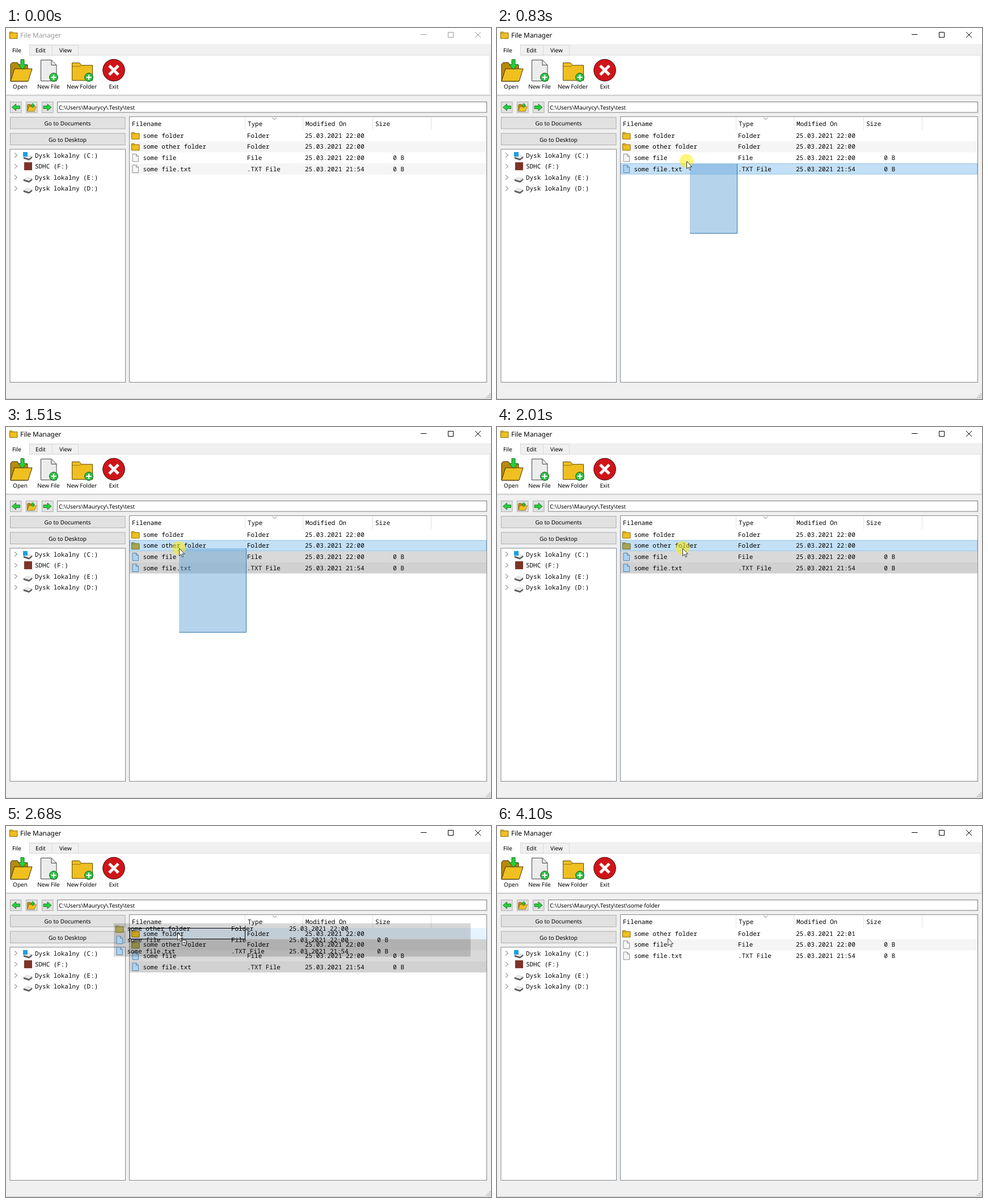
These frames come from a looping animation (855 by 655 pixels, 4160 ms). An HTML page:

```html
<!DOCTYPE html>
<html lang="en">
<head>
<meta charset="utf-8">
<title>File Manager</title>
<style>
  html, body { margin: 0; width: 100%; height: 100%; overflow: hidden; background: #f0f0f0; }
  svg { display: block; width: 100vw; height: 100vh; }
  text { font: 10px "Noto Sans", "Open Sans", sans-serif; text-rendering: geometricPrecision; white-space: pre; }
  .title { font-size: 11.9px; }
  .mono { font: 10.92px "Noto Sans Mono", "DejaVu Sans Mono", monospace; }
  .mid { text-anchor: middle; }
  .end { text-anchor: end; }
  .line { fill: none; stroke-width: 1; }
</style>
</head>
<body>
<svg viewBox="0 0 855 655" xmlns="http://www.w3.org/2000/svg">
  <g id="frame"></g>
  <g id="live"></g>
</svg>
<script>
const LOOP = 4160, ROW = 19.6, TOP = 180.2;
const ANCHOR = { x: 423.5, y: 362.5 };   // where the selection band starts
const GRAB = { x: 330, y: 216 };         // where the rows are picked up

// time, cursor x, y, mode: h = pressed, b = selecting, d = dragging
const POSES = [
  [50, 402, 569, ''], [110, 405, 545, ''], [180, 410, 500, ''], [240, 416, 446, ''],
  [310, 420, 402, ''], [380, 423, 374, ''], [460, 424, 362, ''],
  [590, 424, 362, 'b'], [650, 417, 345, 'b'], [710, 400, 308, 'b'], [770, 374, 268, 'b'],
  [830, 334, 235, 'b'], [890, 322, 227, 'b'], [950, 317, 223, 'b'], [1020, 314, 220, 'b'],
  [1140, 312, 215, 'b'], [1200, 309, 214, 'b'], [1270, 307, 214, 'b'], [1330, 306, 214, 'b'],
  [1450, 305, 214, 'b'], [1570, 305, 215, 'b'], [1630, 305, 215, ''],
  [1820, 307, 215, ''], [1880, 313, 215, ''], [1950, 321, 215, ''],
  [2010, 327, 214, 'h'], [2070, 330, 215, 'h'],
  [2130, 325, 211, 'd'], [2190, 316, 203, 'd'], [2250, 309, 196, 'd'], [2310, 305, 193, 'd'],
  [2370, 303, 188, 'd'], [2680, 302, 188, 'd'], [2800, 301, 188, ''],
  [3240, 301, 188, 'h'], [3300, 301, 188, ''], [3360, 301, 188, 'h'], [3480, 301, 188, ''],
  [4100, 301, 198, '']
];
const DROPPED = 2800, OPENED = 3480;

const dir = (name, time) => ({ dir: true, name, type: 'Folder', time, size: '' });
const file = (name, type, time) => ({ name, type, time, size: '0 B' });
const plain = file('some file', 'File', '22:00'), txt = file('some file.txt', '.TXT File', '21:54');
const BEFORE = [dir('some folder', '22:00'), dir('some other folder', '22:00'), plain, txt];
const AFTER = [dir('some folder', '22:01')];
const INSIDE = [dir('some other folder', '22:01'), plain, txt];

const box = (x, y, w, h, fill, stroke = 'none') =>
  `<rect x="${x}" y="${y}" width="${w}" height="${h}" fill="${fill}" stroke="${stroke}"/>`;
const line = (d, stroke, w = 1) => `<path class="line" d="${d}" stroke="${stroke}" style="stroke-width:${w}"/>`;
const shape = (d, fill, stroke, w = 1) =>
  `<path d="${d}" fill="${fill}" stroke="${stroke}" stroke-width="${w}" stroke-linejoin="round"/>`;
const text = (x, y, s, cls = '', fill = '#000') => `<text x="${x}" y="${y}" class="${cls}" fill="${fill}">${s}</text>`;
const mono = (x, y, s, cls = '') => text(x, y, s, 'mono ' + cls);
const at = (x, y, body, more = '') => `<g transform="translate(${x} ${y}) ${more}">${body}</g>`;

const folder = (x, y, w, h, fill = '#f0c020', edge = '#8c6a08') =>
  shape(`M${x} ${y + h}V${y}h${w * .36}l${w * .1} ${h * .14}H${x + w}V${y + h}Z`, fill, edge) +
  line(`M${x} ${y + h * .2}h${w * .38}l${w * .08} ${-h * .06}`, edge, .6);
const page = (x, y, w, h, fold, fill, edge) =>
  shape(`M${x} ${y}h${w - fold}l${fold} ${fold}v${h - fold}h${-w}Z`, fill, edge) +
  line(`M${x + w - fold} ${y}v${fold}h${fold}`, edge);
const arrow = (x, y, turn, size = 1) =>
  at(x, y, shape('M-7-2.4H0V-6L7 0 0 6V2.4H-7Z', '#28cf3c', '#116b1c', .8), `rotate(${turn}) scale(${size})`);
const plus = (x, y) => `<circle cx="${x}" cy="${y}" r="7.4" fill="#2fc544" stroke="#14531c"/>` +
  line(`M${x - 4.5} ${y}h9M${x} ${y - 4.5}v9`, '#fff', 2.2);
const openFolder = shape('M0 33V3l3-3h9l3 4h15v29Z', '#b88a0c', '#3d2e04') +
  shape('M0 33 7 11H38L31 33Z', '#f0c020', '#3d2e04');
const disk = y => shape(`M31 ${y + 2}l6-3.5 9 2.5-5.5 4Z`, '#ececec', '#b5b5b5', .6) +
  shape(`M31 ${y + 2}l9.500 3 5.500-4v2.500l-5.500 4-9.500-3Z`, '#555', '#777', .5);

function drawFrame() {
  let s = box(0, 0, 855, 28.500, '#fff') + folder(6.500, 7, 13.500, 11.500);

  // tabs and ribbon
  s += box(-.5, 48, 853.500, 69.500, '#fff', '#dcdcdc');
  s += box(41.500, 30.500, 40, 17.500, '#f0f0f0', '#d9d9d9') + box(81.500, 30.500, 46, 17.500, '#f0f0f0', '#d9d9d9');
  s += box(0, 28, 41, 21, '#fff') + line('M41.500 28.500V48', '#d9d9d9');
  s += text(11, 43, 'File') + text(52, 43, 'Edit') + text(94, 43, 'View');
  s += line('M0 119.500H855', '#b4b4b4') + line('M0 120.500H855', '#fafafa');
  s += at(8, 61, openFolder) + arrow(29, 64.500, 90, 1.25);
  s += page(61.500, 56.500, 27.500, 37, 9, '#ececec', '#444') + plus(84, 87);
  s += folder(116.500, 61.500, 36, 31, '#efbf20', '#5d4707') + plus(146, 87);
  s += '<circle cx="190" cy="74.500" r="19.300" fill="#cf1519" stroke="#3c0506"/>' +
    line('M182 66.500l16 16M198 66.500l-16 16', '#fff', 5);
  [[25, 'Open'], [75, 'New File'], [133.500, 'New Folder'], [190, 'Exit']]
    .forEach(([x, label]) => s += text(x, 107, label, 'mid'));

  // navigation
  [7.500, 35.500, 63.500].forEach(x => s += box(x, 130.500, 19.500, 19, '#e1e1e1', '#adadad'));
  s += arrow(17.500, 140, 180) + arrow(73, 140, 0);
  s += at(37.500, 134.500, openFolder, 'scale(.42 .38)') + arrow(47, 136.500, -90, .55);
  s += box(90.500, 130.500, 757, 18.500, '#fff', '#7a7a7a');
  [['Documents', 157.500], ['Desktop', 186]].forEach(([name, y]) =>
    s += box(7.500, y, 202.500, 20.500, '#e1e1e1', '#adadad') + text(108.500, y + 14.500, 'Go to ' + name, 'mid'));

  // drives
  s += box(7, 214, 203.500, 411.500, '#fff', '#828790');
  ['Dysk lokalny (C:)', 'SDHC (F:)', 'Dysk lokalny (E:)', 'Dysk lokalny (D:)'].forEach((name, i) => {
    const y = 224.500 + i * ROW;
    s += line(`M15 ${y - 4}l4.500 4-4.500 4`, '#9a9a9a', 1.2) + mono(51, y + 4, name);
    s += i == 1 ? box(32, y - 7, 14, 14, '#7d3328') : disk(y + 1.500);
    if (!i) s += box(30, 219, 8, 8, '#1ba1e2');
  });

  // table
  s += box(217.500, 156.500, 630, 469, '#fff', '#828790');
  [421.500, 523.500, 646.500, 749.500].forEach(x => s += line(`M${x} 157V180`, '#e2e2e2'));
  [[222, 'Filename'], [426, 'Type'], [528, 'Modified On'], [651, 'Size']]
    .forEach(([x, name]) => s += mono(x, 172.500, name));
  s += line('M470 158.500l3.500 3 3.500-3', '#777');

  // size grip
  for (let i = 0; i < 3; i++)
    for (let j = 0; j <= i; j++) s += box(852 - j * 3, 645 + i * 3, 2, 2, '#b8b8b8');
  s += line('M0 654.500H855', '#d0d0d0');
  document.getElementById('frame').innerHTML = s;
}

function cells(f, i, picked) {
  const y = TOP + i * ROW, base = y + 13.500;
  const icon = f.dir
    ? folder(221.500, y + 4.500, 13.500, 11.500, picked ? '#a9a553' : '#f0c020', picked ? '#6d6a2c' : '#8c6a08')
    : page(223, y + 3, 10.500, 13.500, 4, picked ? '#a9d2f3' : '#f6f6f6', picked ? '#5a83a3' : '#8c8c8c');
  return icon + mono(241.500, base, f.name) + mono(425, base, f.type) +
    mono(527, base, '25.03.2021 ' + f.time) + mono(702, base, f.size, 'end');
}

function rows(list, first, current, hover) {
  return list.map((f, i) => {
    const y = TOP + i * ROW, picked = i >= first;
    let s = i % 2 ? box(218, y, 629, ROW, '#f5f5f5') : '';
    if (i == hover) s += box(218, y, 629, ROW, '#e5f3ff');
    if (picked && i == current) s += box(218.500, y + .3, 628, ROW - 1, '#c3e0f7', '#91c3e6');
    else if (picked) s += box(218, y, 629, ROW, 'rgba(0,0,0,.15)');
    return s + cells(f, i, picked);
  }).join('');
}

function band(cx, cy) {
  const { x, y } = ANCHOR;
  if (x - cx < 1) return '';
  return box(cx, cy, x - cx, y - cy, 'rgba(98,161,212,.47)') +
    line(`M${cx} ${y}H${x}V${cy}`, '#2f78b0');
}

function dragged(x, y) {
  const s = box(218, TOP + ROW, 629, 3 * ROW, 'rgba(0,0,0,.155)') +
    BEFORE.slice(1).map((f, i) => cells(f, i + 1, true)).join('');
  return at(x - GRAB.x, y - GRAB.y, s);
}

function dropMark(y) {
  if (y > 203) return '';
  return y > 195 ? line('M218 199.500H422', '#000') : box(218.500, 180.500, 203, 19, 'none', '#000');
}

function cursor(x, y, mode) {
  const halo = 'hb'.includes(mode) && mode
    ? `<circle cx="${x}" cy="${y - .5}" r="12" fill="#ffee00" fill-opacity=".52"/>` : '';
  const badge = mode == 'd'
    ? box(x + 8.500, y + 13.500, 7, 8.500, '#fff', '#222') + line(`M${x + 10} ${y + 18}h4M${x + 12} ${y + 16}v4`, '#222') : '';
  return halo + at(x, y, shape('M.5.5V13.500l3-2.800 2.200 5 2-.9L5.600 10H9.800Z', '#fff', '#222', .9)) + badge;
}

function scene(n) {
  const [t, x, y, mode] = POSES[n] || [0, 0, 0, ''];
  const ink = n < 0 ? '#999' : '#000';
  const path = 'C:\\Users\\Maurycy\\.Testy\\test' + (t >= OPENED ? '\\some folder' : '');
  let s = text(25, 16.500, 'File Manager', 'title', ink) + text(93, 144, path);
  s += line('M731 11.500h10.500M779.500 7.500h9v9h-9ZM827 7l10 10M837 7l-10 10', ink);

  if (t >= OPENED) s += rows(INSIDE, 9);
  else if (t >= DROPPED) s += rows(AFTER, 9, 9, 0);
  else if (mode == 'b') {
    // the band trails slightly behind the pointer
    const [, px, py] = POSES[n - 1];
    const cx = x + .15 * (px - x), cy = y + .15 * (py - y);
    const first = Math.floor((cy - TOP) / ROW);
    s += rows(BEFORE, first, first) + band(cx, cy);
  } else {
    const over = mode == 'd' && y < 200;
    s += rows(BEFORE, t >= 1630 ? 1 : 9, over ? 9 : 1, over ? 0 : 9);
  }
  if (mode == 'd') s += dropMark(y) + dragged(x, y);
  return n < 0 ? s : s + cursor(x, y, mode);
}

const live = document.getElementById('live'), start = performance.now();
let shown = null;
function tick() {
  const t = (performance.now() - start) % LOOP;
  const n = POSES.filter(p => p[0] <= t).length - 1;
  if (n !== shown) live.innerHTML = scene(shown = n);
  requestAnimationFrame(tick);
}
drawFrame();
tick();
</script>
</body>
</html>
```
